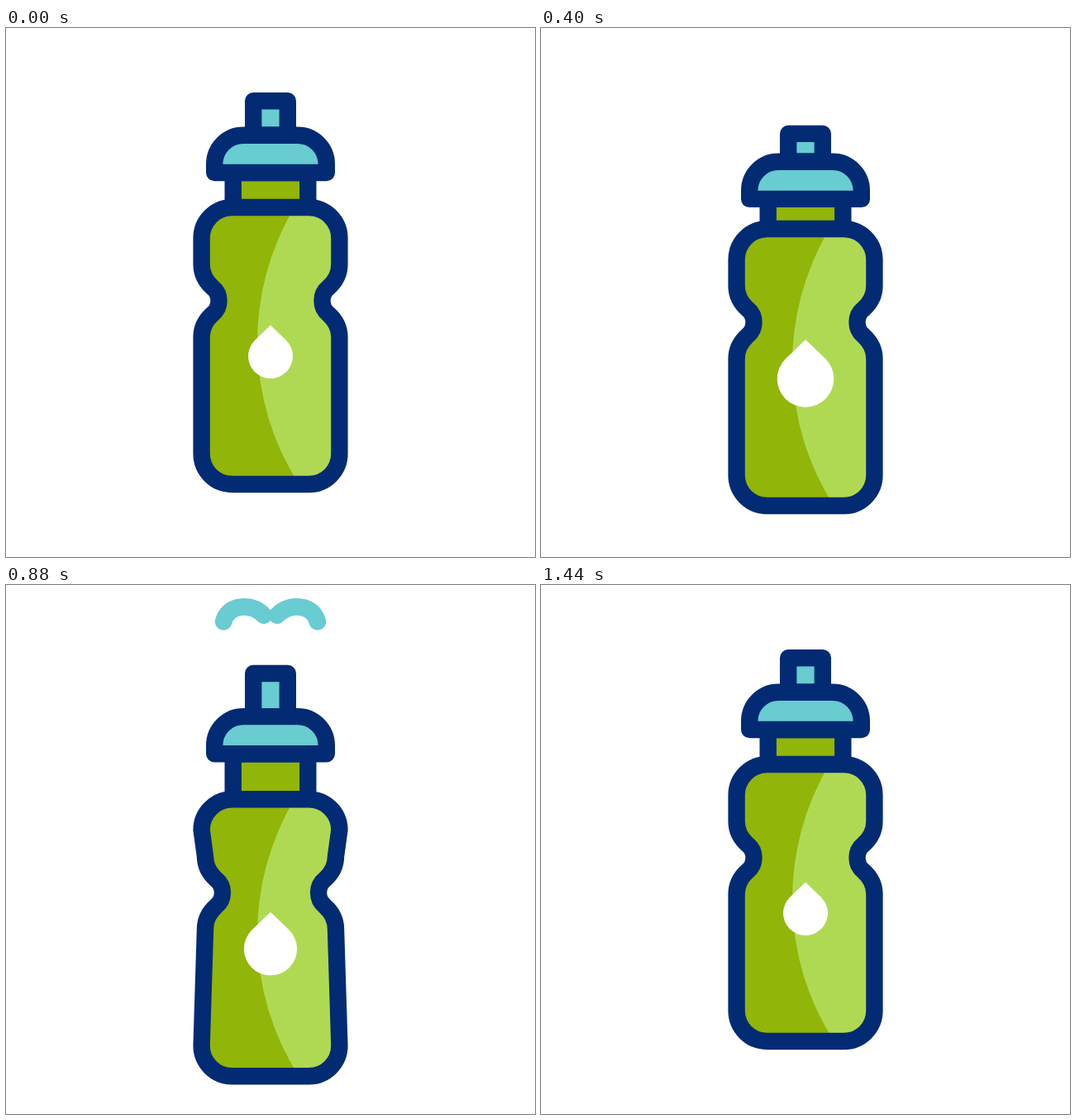
An HTML page for the animation above (1920 ms loop, 640 by 640 pixels).

```html
<!DOCTYPE html>
<html lang="en">
<head>
<meta charset="utf-8">
<title>Sports bottle</title>
<style>
  html, body { margin: 0; width: 100%; height: 100%; overflow: hidden; background: #fff; }
  svg { display: block; width: 100vw; height: 100vh; }
  .line { stroke: #032b74; stroke-width: 20.4; stroke-linejoin: round; }
  .dark { fill: #91b508; }
  .light { fill: #b0d953; }
  .aqua { fill: #68ccd1; }
  .water { fill: none; stroke: #68ccd1; stroke-width: 20.8; stroke-linecap: round; stroke-linejoin: round; }
</style>
</head>
<body>
<svg viewBox="0 0 640 640">
  <defs>
    <clipPath id="inside"><path id="mask"/></clipPath>
  </defs>
  <g id="water">
    <path class="water" pathLength="100" d="M320 47V38C320 20 304 7.5 288 7.5C274 7.5 262 16 262 35"/>
    <path class="water" pathLength="100" d="M320 47V38C320 20 336 7.5 352 7.5C366 7.5 378 16 378 35"/>
  </g>
  <path id="neck" class="line dark"/>
  <path id="nozzle" class="line aqua"/>
  <path id="cap" class="line aqua" d="M252.2 175V164.8A35 35 0 0 1 287.2 129.8H352.8A35 35 0 0 1 387.8 164.8V175Z"/>
  <g id="body">
    <path id="fill" class="dark"/>
    <path class="light" clip-path="url(#inside)" d="M348.8 217A319 319 0 0 0 354.4 552H410V217Z"/>
    <path id="outline" class="line" fill="none"/>
    <path id="drop" fill="#fff" d="M320 359.6L339.1 377.9A27 27 0 1 1 300.9 377.9Z"/>
  </g>
</svg>
<script>
const LOOP = 1920, STEP = 40;
const $ = id => document.getElementById(id);
const jets = document.querySelectorAll('.water');

// Eased progress from 0 to 1 between two times
function ease(t, from, to) {
  const u = Math.min(1, Math.max(0, (t - from) / (to - from)));
  return u * u * (3 - 2 * u);
}

const shift = (el, y) => el.setAttribute('transform', `translate(0 ${y})`);

// Bottle contour with the waist pinched inwards by q on both sides
function contour(q) {
  const l = x => x + q, r = x => 640 - x - q;
  return `M273.6 217.1H366.4A37 37 0 0 1 403.4 254.1L${r(236.6)} 286` +
    `C${r(236.6)} 297 ${r(242)} 307 ${r(250)} 314` +
    `C${r(260)} 322 ${r(260)} 338 ${r(250)} 346` +
    `C${r(242)} 353 ${r(236.6)} 363 ${r(236.6)} 374` +
    `L403.4 515A37 37 0 0 1 366.4 552H273.6A37 37 0 0 1 236.6 515` +
    `L${l(236.6)} 374C${l(236.6)} 363 ${l(242)} 353 ${l(250)} 346` +
    `C${l(260)} 338 ${l(260)} 322 ${l(250)} 314` +
    `C${l(242)} 307 ${l(236.6)} 297 ${l(236.6)} 286` +
    `L236.6 254.1A37 37 0 0 1 273.6 217.1Z`;
}

function draw(t) {
  const bodyY = 47 * (ease(t, 76, 680) - ease(t, 778, 1300));
  const press = ease(t, 80, 470) * (1 - ease(t, 580, 880));
  const squeeze = ease(t, 580, 880) - ease(t, 880, 1440);
  const capY = bodyY + 6.4 * press - 13 * squeeze;
  const tipY = capY + 8.5 * press - 10.5 * squeeze;

  const d = contour(4.4 * squeeze);
  for (const id of ['mask', 'fill', 'outline']) $(id).setAttribute('d', d);
  shift($('body'), bodyY);
  shift($('cap'), capY);
  $('neck').setAttribute('d', `M274.7 ${175 + capY}H365.3V${217 + bodyY}H274.7Z`);
  $('nozzle').setAttribute('d', `M299.2 ${88.2 + tipY}H340.8V${129.8 + capY}H299.2Z`);

  const size = 1 + 0.39 * (ease(t, 85, 585) - ease(t, 652, 1100));
  $('drop').setAttribute('transform', `translate(320 392) scale(${size}) translate(-320 -392)`);

  const head = 100 * ease(t, 540, 960), tail = 100 * ease(t, 758, 1088);
  const wet = t > 545 && t < 1080;
  $('water').setAttribute('visibility', wet ? 'visible' : 'hidden');
  shift($('water'), tipY);
  for (const jet of jets) {
    jet.setAttribute('stroke-dasharray', `${Math.max(0.1, head - tail)} 300`);
    jet.setAttribute('stroke-dashoffset', -tail);
  }
}

const start = performance.now();
function tick() {
  const t = (performance.now() - start) % LOOP;
  draw(Math.floor(t / STEP) * STEP);
  requestAnimationFrame(tick);
}
tick();
</script>
</body>
</html>
```
